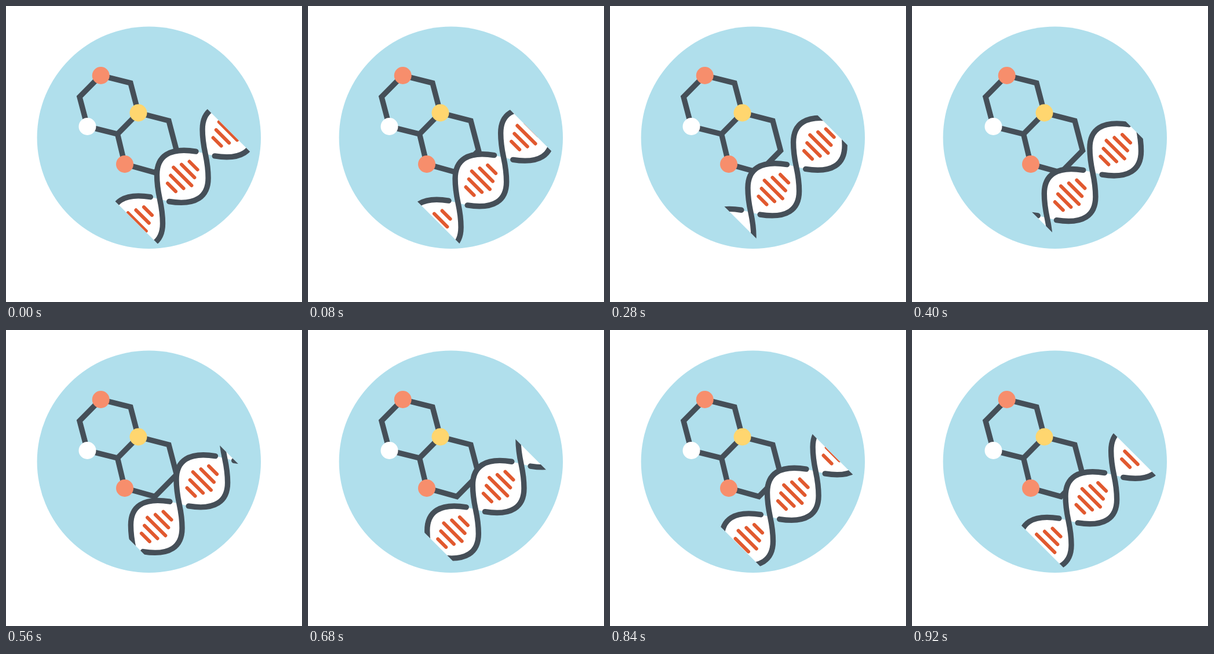
Recreate the animation shown at these times as an HTML page. Size 511 by 511 pixels, loop 960 ms.

```html
<!DOCTYPE html>
<html lang="en">
<head>
<meta charset="utf-8">
<title>DNA and molecule</title>
<style>
  html, body { margin: 0; height: 100%; overflow: hidden; background: #fff; }
  svg { display: block; width: 100vw; height: 100vh; }
  .line { fill: none; stroke: #454f58; stroke-width: 9.4; }
  .bars { fill: none; stroke: #e1592f; stroke-width: 6; stroke-linecap: round; }
</style>
</head>
<body>
<svg viewBox="0 0 511 511">
  <defs>
    <clipPath id="band"><path d="M0 148.7L400 548.7L569.7 400L169.7 0Z"/></clipPath>
    <path id="lens" fill="#fff" d="M0 0C-3-14-5-26-5-42C-5-74 16-90 62.5-82.5L78.6-78.6
      c3 14 5 26 5 42c0 32-21 48-67.5 40.5Z"/>
    <g id="strand">
      <path class="line" stroke-linecap="round" d="M62.5-82.5C16-90-5-74-5-42C-5-26-3-14 0 0
        C3 14 5 26 5 42C5 74-16 90-62.5 82.5"/>
      <path class="bars" id="bars"/>
    </g>
  </defs>
  <ellipse cx="246.8" cy="227.2" rx="193.2" ry="191.7" fill="#b0dfec"/>
  <path class="line" d="M163.5 120L215 133L228.500 184.500L192.500 221L140.500 208L127 157Z
    M228.500 184.500L281 198L294.500 249.500L257 287.500L205 273L192.500 221"/>
  <g fill="#f78e6c">
    <circle cx="163.700" cy="120" r="15"/>
    <circle cx="205" cy="273" r="15"/>
    <circle cx="228.500" cy="184.500" r="15" fill="#ffd66f"/>
    <circle cx="140.500" cy="208" r="15" fill="#fff"/>
  </g>
  <g clip-path="url(#band)"><g id="helix"></g></g>
</svg>
<script>
  const LOOP = 960, TICK = 40, SHIFT = 3.22, PERIOD = 78.6;
  const helix = document.getElementById('helix');

  const halfLengths = [7, 11.2, 15.6, 11.2, 7];
  document.getElementById('bars').setAttribute('d', halfLengths.map((half, i) => {
    const offset = PERIOD / 2 + (i - 2) * 9.4;
    return `M${offset - half} ${-offset - half}l${2 * half} ${2 * half}`;
  }).join(''));

  const repeat = id => [-2, -1, 0, 1, 2].map(i =>
    `<use href="#${id}" x="${-i * PERIOD}" y="${i * PERIOD}"/>`).join('');
  helix.innerHTML = repeat('lens') + repeat('strand');

  function draw() {
    const d = Math.floor(performance.now() % LOOP / TICK) * SHIFT;
    helix.setAttribute('transform', `translate(${344.1 - d} ${255 + d})`);
    requestAnimationFrame(draw);
  }
  draw();
</script>
</body>
</html>
```
